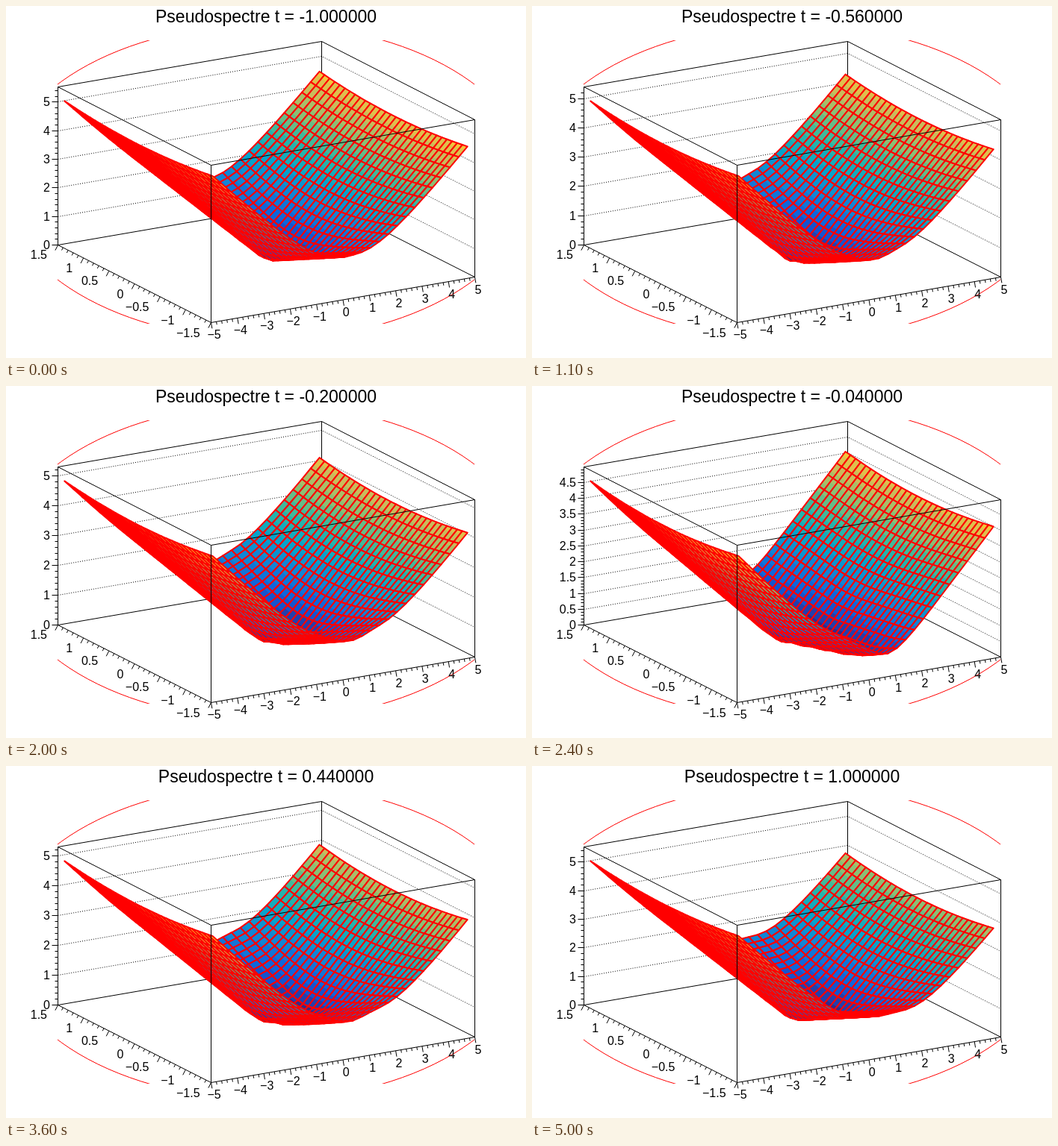
Write an HTML page with a canvas that moves like this. It is 696 by 472 pixels and loops after 5.1 s.

```html
<!DOCTYPE html>
<html lang="fr">
<head>
<meta charset="utf-8">
<title>Pseudospectre</title>
<style>
  html, body { margin: 0; width: 100%; height: 100%; overflow: hidden; background: #fff; }
  canvas { display: block; }
</style>
</head>
<body>
<canvas id="stage" width="696" height="472"></canvas>
<script>
const ctx = document.getElementById('stage').getContext('2d');
const STEPS = 51, STEP_MS = 100, BINS = 30;
const BOX_HEIGHT = 211, PEAK_HEIGHT = 193.3;
const FONT = '"Liberation Sans", Arial, sans-serif';

// t, left end, shoulder x, shoulder height, right end of the spectrum hull
const HULL = [
  [-1, 0, .2, .04, .53],
  [-.56, -.13, .3, .18, .75],
  [-.2, -.22, .35, .26, .95],
  [-.04, -.52, .75, .8, 1],
  [.04, -.58, .82, .84, 1],
  [.12, -.53, .87, .72, .98],
  [.2, -.42, .8, .78, 1],
  [.44, -.23, .35, .28, 1.21],
  [.72, -.22, .4, .25, 1.3],
  [1, 0, .5, .06, 1.34]
];

const PALETTE = [
  [53, 42, 135], [15, 92, 221], [20, 129, 214], [6, 164, 202], [46, 183, 164],
  [135, 191, 119], [209, 187, 89], [254, 200, 50], [249, 251, 14]
];

const mix = (a, b, k) => a + (b - a) * k;
const mixAll = (a, b, k) => a.map((v, i) => mix(v, b[i], k));

function hullAt(t) {
  let i = 0;
  while (i < HULL.length - 2 && t > HULL[i + 1][0]) i++;
  const a = HULL[i], b = HULL[i + 1];
  return mixAll(a, b, (t - a[0]) / (b[0] - a[0])).slice(1);
}

function segmentDistance(x, y, ax, ay, bx, by) {
  const dx = bx - ax, dy = by - ay;
  const k = ((x - ax) * dx + (y - ay) * dy) / (dx * dx + dy * dy);
  const u = Math.max(0, Math.min(1, k));
  return Math.hypot(x - ax - u * dx, y - ay - u * dy);
}

function spectrumDistance(x, y, [left, mid, top, right]) {
  y = Math.abs(y);
  const roof = x < mid ? top * (x - left) / (mid - left) : top * (right - x) / (right - mid);
  const outside = y >= roof
    ? Math.min(segmentDistance(x, y, left, 0, mid, top), segmentDistance(x, y, mid, top, right, 0))
    : 0;
  return Math.hypot(outside, .1 * top);
}

// Screen position of a point; height is in pixels.
function project(x, y, height = 0) {
  const u = (x + 5) / 10, v = (y + 1.5) / 3;
  return [274 + 353 * u - 205 * v, 424 - 61 * u - 104 * v - height];
}

function path(points) {
  ctx.beginPath();
  points.forEach(([x, y], i) => i ? ctx.lineTo(x, y) : ctx.moveTo(x, y));
}

function line(...points) {
  path(points.map(([x, y]) => [x + .5, y + .5]));
  ctx.stroke();
}

function label(text, x, y, align, size = 16) {
  ctx.font = size + 'px ' + FONT;
  ctx.textAlign = align;
  ctx.textBaseline = 'alphabetic';
  ctx.fillText(String(text).replace('-', size === 16 ? '\u2212' : '-'), x, y);
}

function levelColor(k) {
  const level = Math.max(0, Math.min(19, Math.floor(k * 20))) / 19 * 8;
  const i = Math.min(7, Math.floor(level));
  return `rgb(${mixAll(PALETTE[i], PALETTE[i + 1], level - i).map(Math.round)})`;
}

function drawArcs() {
  ctx.save();
  ctx.beginPath();
  ctx.rect(69, 46, 558, 380);
  ctx.clip();
  ctx.strokeStyle = '#f00';
  ctx.beginPath();
  ctx.ellipse(348, 236, 355, 211.8, 0, 0, 2 * Math.PI);
  ctx.stroke();
  ctx.restore();
}

function drawBack(scale, zTop, major) {
  ctx.strokeStyle = '#000';
  line([69, 320], [422, 259], [627, 363]);
  line([69, 108], [422, 47], [627, 152]);
  line([422, 47], [422, 259]);
  ctx.setLineDash([1, 2]);
  for (let z = major; z < zTop; z += major) {
    const h = Math.round(z * scale);
    line([69, 320 - h], [422, 259 - h], [627, 363 - h]);
  }
  ctx.setLineDash([]);
}

function drawSurface(grid, scale, zTop, zMin) {
  const shade = z => levelColor((z - zMin) / (zTop - zMin));
  const lerpPoint = (a, b, k) => [mix(a[0], b[0], k), mix(a[1], b[1], k)];
  ctx.lineJoin = 'round';
  for (let i = BINS - 2; i >= 0; i--) {
    for (let j = BINS - 2; j >= 0; j--) {
      const cell = [grid[i][j], grid[i + 1][j], grid[i + 1][j + 1], grid[i][j + 1]];
      const [a, b, c, d] = cell.map(p => project(p.x, p.y, p.z * scale));
      const near = (cell[0].z + cell[3].z) / 2, far = (cell[1].z + cell[2].z) / 2;
      path([a, b, c, d]);
      ctx.fillStyle = shade((near + far) / 2);
      ctx.fill();
      for (let s = 0; s < 3; s++) {
        const k = s / 3, m = (s + 1) / 3;
        path([lerpPoint(a, b, k), lerpPoint(a, b, m), lerpPoint(d, c, m), lerpPoint(d, c, k)]);
        ctx.fillStyle = shade(mix(near, far, (k + m) / 2));
        ctx.fill();
      }
      path([a, b, c, d]);
      ctx.closePath();
      ctx.strokeStyle = '#f00';
      ctx.lineWidth = 2;
      ctx.stroke();
    }
  }
  ctx.lineWidth = 1;
}

function drawFront() {
  ctx.strokeStyle = '#000';
  line([69, 108], [274, 213], [627, 152]);
  line([69, 320], [274, 424], [627, 363]);
  line([69, 108], [69, 320]);
  line([274, 213], [274, 424]);
  line([627, 152], [627, 363]);
}

function tick([x, y], nx, ny, isMajor) {
  const size = isMajor ? 8 : 4;
  line([x, y], [x + nx * size, y + ny * size]);
}

function drawAxes(scale, zTop, major) {
  ctx.fillStyle = '#000';
  for (let n = 0; n * major / 5 <= zTop; n++) {
    const z = n * major / 5, y = Math.round(320 - z * scale);
    tick([69, y], -1, 0, n % 5 === 0);
    if (n % 5 === 0) label(+z.toFixed(1), 59, y + 6, 'right');
  }
  for (let n = 0; n <= 50; n++) {
    tick(project(-5 + n / 5, -1.5), .17, .985, n % 5 === 0);
    if (n % 5 === 0) label(n / 5 - 5, 278.5 + 7.07 * n, 446 - 1.2 * n, 'center');
  }
  for (let n = 0; n <= 30; n++) {
    tick(project(-5, 1.5 - n / 10), -.45, .89, n % 5 === 0);
    if (n % 5 === 0) label(1.5 - n / 10, 55 + 6.82 * n, 339 + 3.5 * n, 'right');
  }
}

function makeGrid(t) {
  const hull = hullAt(t);
  return Array.from({ length: BINS }, (_, i) => Array.from({ length: BINS }, (_, j) => {
    const x = -5 + 10 * (i + .5) / BINS, y = -1.5 + 3 * (j + .5) / BINS;
    return { x, y, z: spectrumDistance(x, y, hull) };
  }));
}

function draw(step) {
  const t = (step - 25) / 25;
  const grid = makeGrid(t);
  const values = grid.flat().map(p => p.z);
  const scale = PEAK_HEIGHT / Math.max(...values);
  const zTop = BOX_HEIGHT / scale;
  const major = zTop < 5 ? .5 : 1;

  ctx.fillStyle = '#fff';
  ctx.fillRect(0, 0, 696, 472);
  ctx.lineWidth = 1;
  drawArcs();
  drawBack(scale, zTop, major);
  drawSurface(grid, scale, zTop, Math.min(...values));
  drawFront();
  drawAxes(scale, zTop, major);
  label('Pseudospectre t = ' + t.toFixed(6), 348, 22, 'center', 23);
}

let shown = -1;
function tickFrame() {
  const step = Math.floor(performance.now() / STEP_MS) % STEPS;
  if (step !== shown) draw(shown = step);
  requestAnimationFrame(tickFrame);
}
tickFrame();
</script>
</body>
</html>
```
